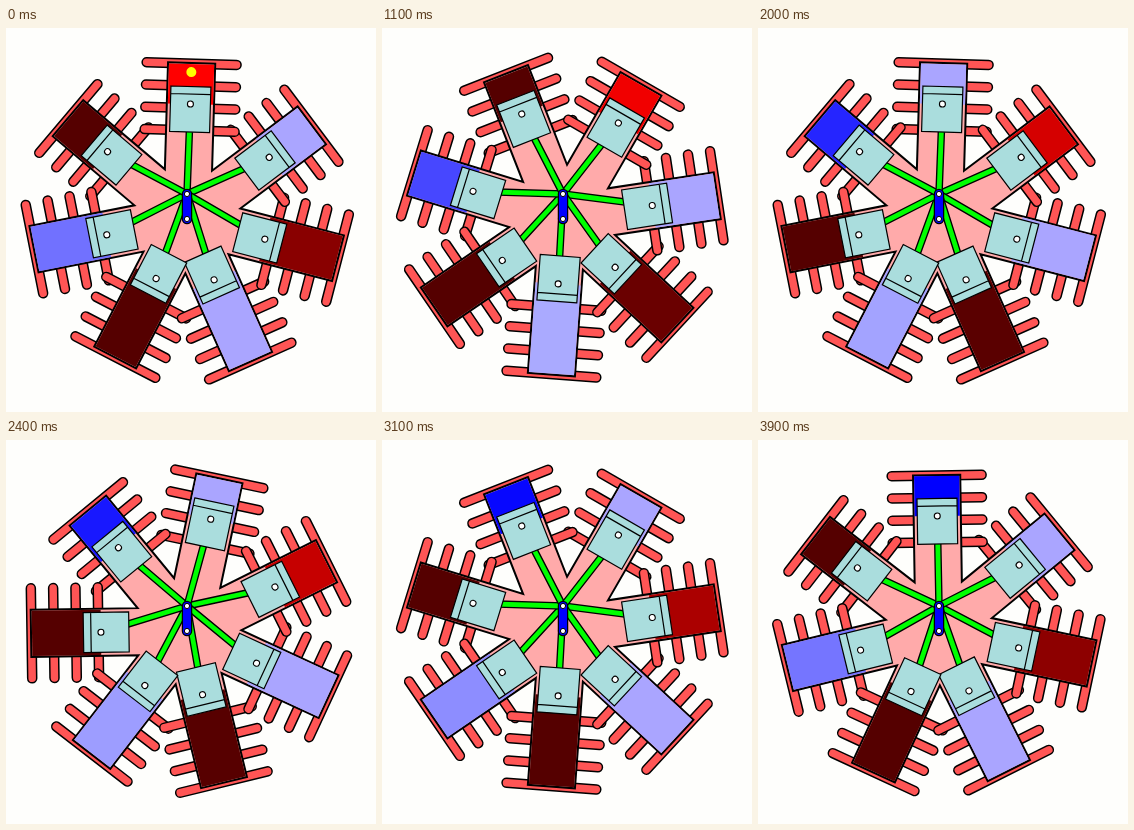
An HTML page with a canvas that plays this animation: 370 px wide and 384 px high, repeating every 4000 ms.

```html
<!DOCTYPE html>
<html lang="en">
<head>
<meta charset="utf-8">
<title>Seven-cylinder rotary engine</title>
<style>
  html, body { margin: 0; width: 100%; height: 100%; overflow: hidden; background: #fefefc; }
  canvas { display: block; }
</style>
</head>
<body>
<canvas id="stage" width="370" height="384"></canvas>
<script>
const ctx = document.getElementById('stage').getContext('2d');
const COUNT = 7, PITCH = 360 / COUNT, LOOP = 4000, STEP = 100, START = 1.7;
const CENTER = { x: 181, y: 191 };
const CRANK = 25, ROD = 90, HEAD = 156, HALF_BORE = 23.6;
const rad = deg => deg * Math.PI / 180;

function capsule(x1, y1, x2, y2, color, outer, inner) {
  ctx.beginPath();
  ctx.moveTo(x1, y1);
  ctx.lineTo(x2, y2);
  ctx.lineCap = 'round';
  for (const [style, width] of [['#000', outer], [color, inner]]) {
    ctx.strokeStyle = style;
    ctx.lineWidth = width;
    ctx.stroke();
  }
}

function disc(x, y, r, fill, outline) {
  ctx.beginPath();
  ctx.arc(x, y, r, 0, 2 * Math.PI);
  ctx.fillStyle = fill;
  ctx.fill();
  if (outline) {
    ctx.strokeStyle = '#000';
    ctx.lineWidth = outline;
    ctx.stroke();
  }
}

// Distance of the piston pin from the centre
function pinRadius(angle) {
  const a = rad(angle);
  return CRANK * Math.cos(a) + Math.sqrt(ROD ** 2 - (CRANK * Math.sin(a)) ** 2);
}

// Colour of the charge through power, exhaust, intake and compression
function gasColor(phase, pin) {
  const volume = (CRANK + ROD - pin) / (2 * CRANK);
  if (phase < 180) return `rgb(${255 - 170 * volume}, 0, 0)`;
  if (phase < 360) return '#500';
  if (phase < 540) return '#aaa5ff';
  return `rgb(${170 * volume}, ${170 * volume}, 255)`;
}

// Run a drawing in a cylinder's own axes, with its head at negative y
function along(cylinder, draw) {
  ctx.save();
  ctx.rotate(rad(cylinder.angle));
  draw(cylinder);
  ctx.restore();
}

function drawFins() {
  for (let i = 0; i < 4; i++) {
    const y = -155.5 + 22.3 * i;
    capsule(-45, y, 45, y, '#f55', 10.5, 7.5);
  }
}

function drawCase(rotation) {
  const valley = HALF_BORE / Math.sin(rad(PITCH / 2));
  const corner = Math.hypot(HEAD, HALF_BORE);
  const spread = Math.atan(HALF_BORE / HEAD);
  ctx.beginPath();
  for (let i = 0; i < COUNT; i++) {
    const a = rad(rotation + i * PITCH);
    for (const [r, b] of [[corner, a - spread], [corner, a + spread], [valley, a + rad(PITCH / 2)]])
      ctx.lineTo(r * Math.sin(b), -r * Math.cos(b));
  }
  ctx.closePath();
  ctx.fillStyle = '#faa';
  ctx.fill();
  ctx.lineJoin = 'miter';
  ctx.strokeStyle = '#000';
  ctx.lineWidth = 2;
  ctx.stroke();
}

function drawGas({ phase, pin }) {
  ctx.fillStyle = gasColor(phase, pin);
  ctx.fillRect(1 - HALF_BORE, 1 - HEAD, 2 * HALF_BORE - 2, HEAD - pin - 1);
  if (phase < 15) disc(0, -147, 5, '#ff0');
}

function drawPiston({ pin }) {
  ctx.beginPath();
  ctx.rect(-20, -pin - 17.5, 40, 45.5);
  ctx.fillStyle = '#add';
  ctx.fill();
  ctx.moveTo(-20, -pin - 10);
  ctx.lineTo(20, -pin - 10);
  ctx.strokeStyle = '#000';
  ctx.lineWidth = 1.2;
  ctx.stroke();
  disc(0, -pin, 3, '#fff', 1.1);
}

function render(time) {
  const rotation = START + 2 * PITCH * time / LOOP;
  const cylinders = Array.from({ length: COUNT }, (_, i) => {
    const angle = rotation + i * PITCH;
    return { angle, phase: (angle + i * 360) % 720, pin: pinRadius(angle) };
  });

  ctx.setTransform(1, 0, 0, 1, 0, 0);
  ctx.fillStyle = '#fefefc';
  ctx.fillRect(0, 0, 370, 384);
  ctx.translate(CENTER.x, CENTER.y);

  for (const c of [...cylinders].reverse()) along(c, drawFins);
  drawCase(rotation);
  for (const c of cylinders) along(c, drawGas);
  for (const { angle, pin } of cylinders)
    capsule(0, -CRANK, pin * Math.sin(rad(angle)), -pin * Math.cos(rad(angle)), '#0f0', 7.5, 4.8);
  for (const c of cylinders) along(c, drawPiston);

  capsule(0, -CRANK, 0, 0, '#00f', 10.5, 8);
  disc(0, -CRANK, 2.6, '#fff', 1);
  disc(0, 0, 2.6, '#fff', 1);
}

function tick(now) {
  render(Math.floor(now % LOOP / STEP) * STEP);
  requestAnimationFrame(tick);
}
tick(performance.now());
</script>
</body>
</html>
```
